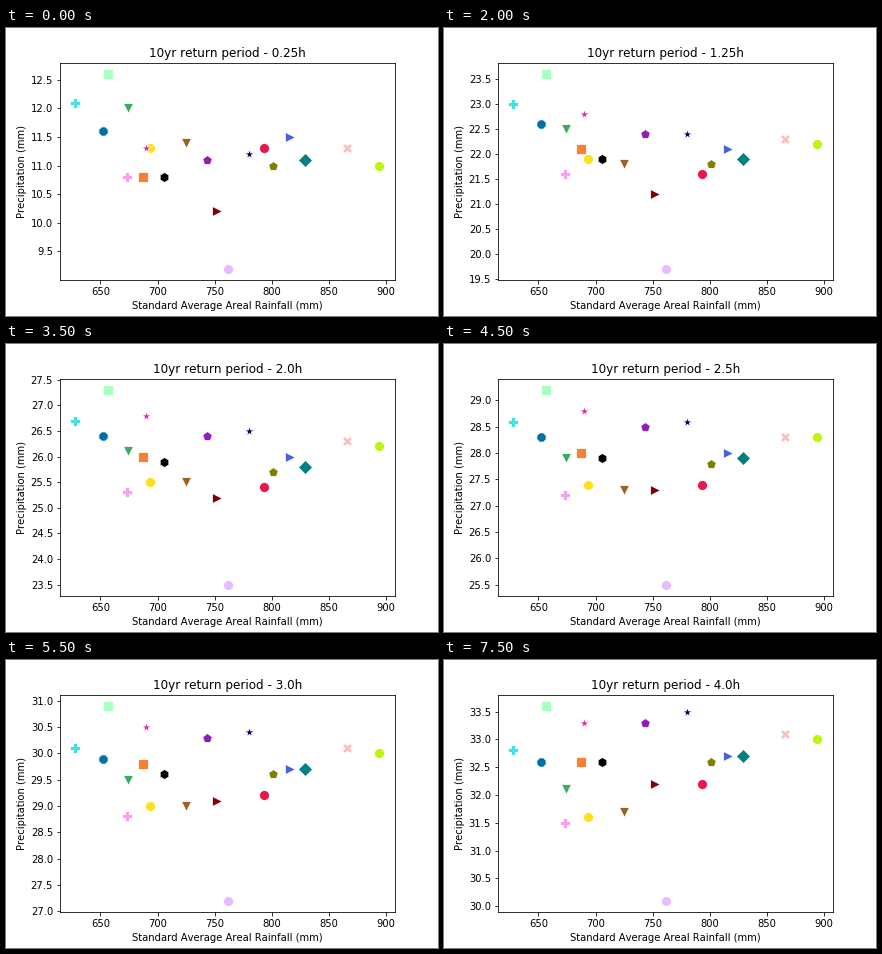
These frames come from a looping animation (432 by 288 pixels, 8 s). A matplotlib script:

```python
import numpy as np
import matplotlib.pyplot as plt
from matplotlib.animation import FuncAnimation
from matplotlib.ticker import FormatStrFormatter, MultipleLocator

plt.rcParams.update({"font.family": "DejaVu Sans", "font.size": 10,
                     "text.kerning_factor": 6})

FRAMES = 16
STEP = 0.25      # hours added per frame
BEND = 0.0085    # cubic term shared by all depth-duration curves
PAD = 0.0585     # vertical margin as a share of the data range

# Average rainfall, marker, colour, depths after 0.25, 1.25 and 4 hours
STATIONS = [
    (628, "P", "#46e0e0", 12.1, 23.0, 32.8),
    (652, "8", "#0070a5", 11.6, 22.6, 32.6),
    (657, "s", "#aaffc3", 12.6, 23.6, 33.6),
    (674, "v", "#3cab60", 12.0, 22.5, 32.1),
    (673, "P", "#fa9eee", 10.8, 21.6, 31.5),
    (693, "o", "#ffe119", 11.3, 21.9, 31.6),
    (687, "s", "#f97f31", 10.8, 22.1, 32.6),
    (690, "*", "#e02cb4", 11.3, 22.8, 33.3),
    (706, "h", "#000000", 10.8, 21.9, 32.6),
    (725, "v", "#9a6324", 11.4, 21.8, 31.7),
    (743, "p", "#911eb4", 11.1, 22.4, 33.3),
    (752.5, ">", "#800008", 10.2, 21.2, 32.2),
    (761.5, "o", "#e6beff", 9.23, 19.69, 30.14),
    (780, "*", "#06066a", 11.2, 22.4, 33.5),
    (793, "o", "#e6194b", 11.3, 21.6, 32.2),
    (801, "p", "#808000", 11.0, 21.8, 32.6),
    (816, ">", "#4363d8", 11.5, 22.1, 32.7),
    (829, "D", "#008080", 11.1, 21.9, 32.7),
    (866, "X", "#fabebe", 11.3, 22.3, 33.1),
    (894, "o", "#bcf60c", 11.0, 22.2, 33.0),
]

xs = [s[0] for s in STATIONS]
knots = np.log([0.25, 1.25, 4.0])
curves = np.polyfit(knots, np.log([s[3:] for s in STATIONS]).T, 2)


def depths(hours):
    """Log-log parabola per station plus the shared bend, to 0.1 mm."""
    t = np.log(hours)
    parabola = curves[0] * t**2 + curves[1] * t + curves[2]
    return np.round(np.exp(parabola + BEND * np.prod(t - knots)), 1)


fig, ax = plt.subplots(figsize=(6, 4), dpi=72)
fig.subplots_adjust(left=0.125, right=0.9, bottom=0.125, top=0.88)
ax.set_xlim(614.63, 907.75)
ax.set_xlabel("Standard Average Areal Rainfall (mm)")
ax.set_ylabel("Precipitation (mm)")
ax.xaxis.set_major_locator(MultipleLocator(50))
title = ax.set_title("", fontsize=12)

dots = [ax.scatter([x], [0], s=100, marker=marker, color=colour,
                   edgecolors="white", linewidths=0.8)
        for x, marker, colour, *_ in STATIONS]


def update(i):
    hours = STEP * (i + 1)
    ys = depths(hours)
    pad = PAD * np.ptp(ys)
    lo, hi = ys.min() - pad, ys.max() + pad
    ax.set_yticks(np.arange(np.ceil(lo * 2) / 2, hi, 0.5))
    ax.yaxis.set_major_formatter(FormatStrFormatter("%.1f"))
    ax.set_ylim(lo, hi)
    for dot, x, y in zip(dots, xs, ys):
        dot.set_offsets([[x, y]])
    title.set_text(f"10yr return period - {hours}h")
    return dots


anim = FuncAnimation(fig, update, frames=FRAMES, interval=500,
                     repeat=True, repeat_delay=0, blit=False)
plt.show()
```
